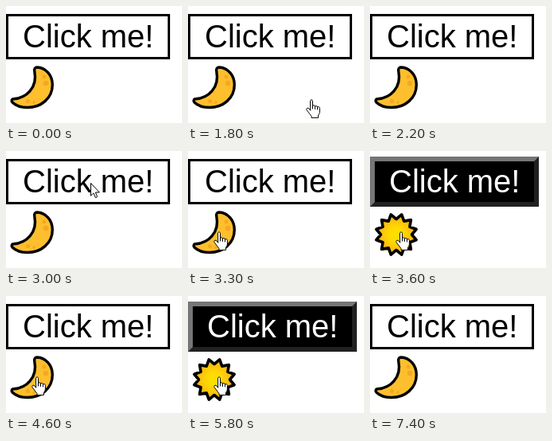
Write an HTML page that moves like this. It is 221 by 147 pixels and loops after 8500 ms.

```html
<!DOCTYPE html>
<html lang="en">
<head>
<meta charset="utf-8">
<title>Click me!</title>
<style>
html, body { margin: 0; width: 100%; height: 100%; overflow: hidden; background: #fff; }
svg { position: absolute; left: 0; top: 0; width: 221px; height: 147px; }
.button {
  position: absolute; left: 0; box-sizing: border-box;
  font: 40px/51px Arial, "Liberation Sans", sans-serif; white-space: nowrap;
}
.light { top: 10px; width: 206px; height: 57px; padding-left: 18px; border: 3px solid #000; }
.dark {
  top: 7px; width: 212px; height: 63px; padding-left: 18px;
  border: 6px outset #767676; background: #000; color: #fff;
}
.outline { stroke: #000; stroke-linejoin: round; stroke-linecap: round; }
.night, .day, .cursor, .hand, .arrow { animation: 8.5s step-end infinite; }
.night { animation-name: night; }
.day { animation-name: day; }
.cursor { animation-name: move; }
.hand { animation-name: hand; }
.arrow { animation-name: arrow; }

@keyframes night {
  0%, 54.117%, 87.058% { visibility: visible; }
  42.352%, 68.235% { visibility: hidden; }
}
@keyframes day {
  0%, 54.117%, 87.058% { visibility: hidden; }
  42.352%, 68.235% { visibility: visible; }
}
@keyframes move {
  0% { transform: translate(148px, 117px); }
  22.352% { transform: translate(172px, 93px); }
  23.529% { transform: translate(189px, 98px); }
  32.941% { transform: translate(204px, 66px); }
  34.117% { transform: translate(158px, 47px); }
  35.294% { transform: translate(106px, 40px); }
  36.47% { transform: translate(72px, 53px); }
  37.647% { transform: translate(39px, 82px); }
  38.823%, 100% { transform: translate(32px, 101px); }
}
@keyframes hand {
  0%, 25.882%, 34.117%, 87.058% { visibility: hidden; }
  21.176%, 32.941%, 37.647% { visibility: visible; }
}
@keyframes arrow {
  0%, 37.647% { visibility: hidden; }
  34.117% { visibility: visible; }
}
</style>
</head>
<body>
<div class="button light night">Click me!</div>
<div class="button dark day">Click me!</div>
<svg viewBox="0 0 221 147">
  <defs>
    <radialGradient id="glow">
      <stop offset=".3" stop-color="#ffdd00"/>
      <stop offset="1" stop-color="#fbb016"/>
    </radialGradient>
  </defs>

  <g class="night">
    <path class="outline" stroke-width="3.4" fill="#fdbf2d"
      d="M39 77C50 77.5 58.3 87 58.3 99C58.3 116 44 127.5 27 127.5C18 127.5 12 125 8 121C6.3 119 7.3 116.8 9.5 116.8C25 116 40 103 35.8 82C35.2 79 36.5 77 39 77Z"/>
    <g fill="#f6a723">
      <circle cx="48" cy="89" r="2.4"/>
      <circle cx="50" cy="97" r="3.3"/>
      <circle cx="27.5" cy="119.5" r="2.6"/>
      <circle cx="35" cy="121" r="1.7"/>
    </g>
  </g>

  <path id="sun" class="day outline" stroke-width="3.6" fill="url(#glow)"/>

  <g class="cursor outline" fill="#fff" stroke-width="1">
    <g class="hand">
      <path d="M5.5 2.5C5.5 .2 8.5 .2 8.5 2.5V8.5C9 7.5 11.5 7.5 11.5 9.2C12 8.2 14.5 8.3 14.5 10C15.2 9.2 17.4 9.5 17.4 11.3V16C17.4 18.5 15.5 19.5 15.5 21V23.4H7V21.5C5.5 19.5 3.5 17 1 13.5C0 12 2.5 10 4 12L5.5 14Z"/>
      <path d="M8.5 8.5V12M11.5 9.2V12.5M14.5 10V13"/>
    </g>
    <path class="arrow" d="M.5 .8V16.2L4 12.9L6.4 18.7L8.7 17.7L6.4 12H11Z"/>
  </g>
</svg>
<script>
const rays = 12;
const points = Array.from({ length: rays * 2 }, (_, i) => {
  const angle = Math.PI * (i + 0.0) / rays - Math.PI / 2;
  const radius = i % 2 ? 26 : 19.5;
  return `${33 + radius * Math.cos(angle)} ${105 + radius * Math.sin(angle)}`;
});
document.getElementById("sun").setAttribute("d", `M${points.join("L")}Z`);
</script>
</body>
</html>
```
